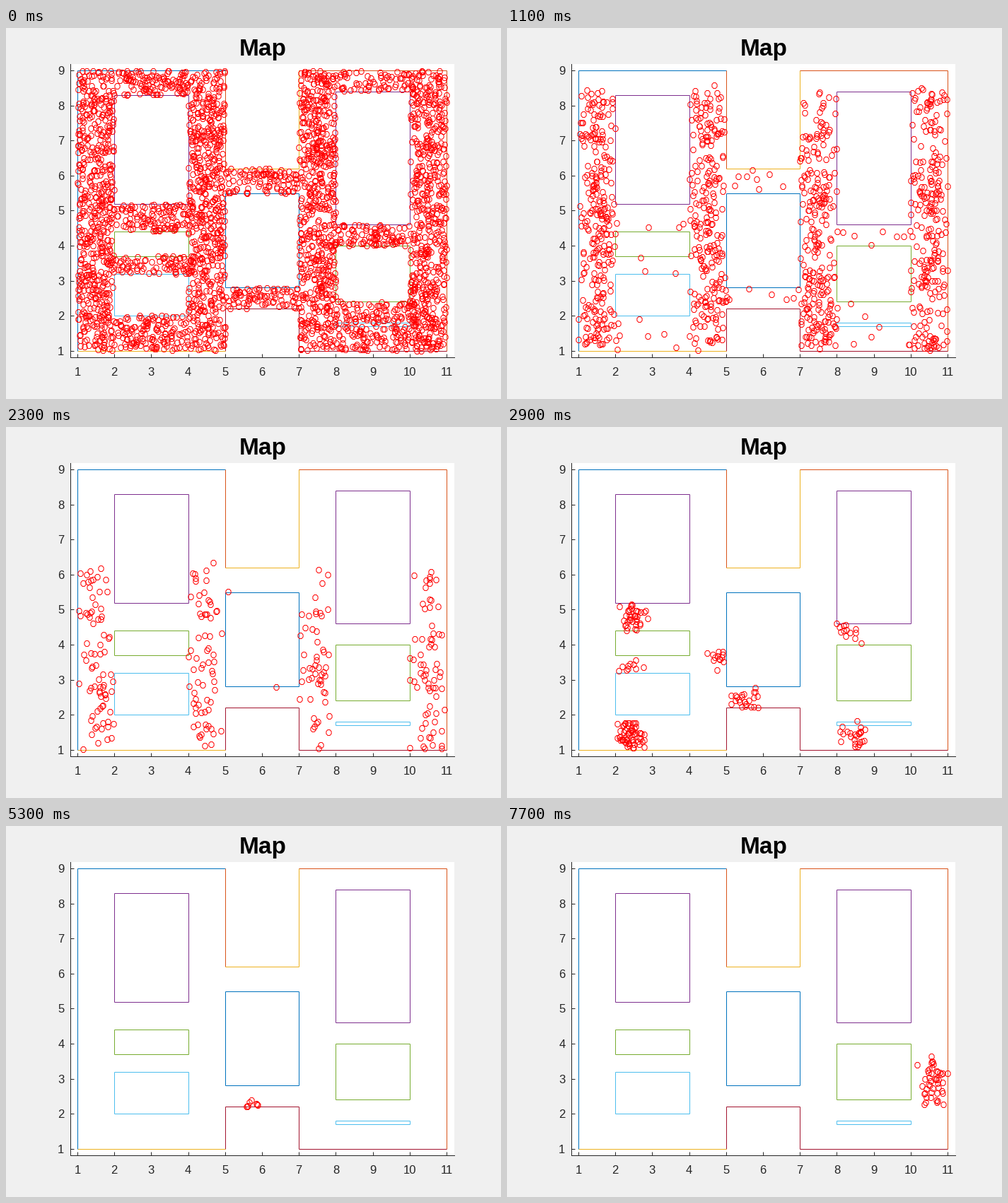
Write a matplotlib script that moves like this. It is 700 px wide and 525 px high and loops after 8 s.

```python
import numpy as np
import matplotlib.pyplot as plt
from matplotlib.animation import FuncAnimation

W, H, DPI = 700, 525, 100
PX = 72 / DPI
FRAMES, INTERVAL = 80, 100
STATES, TURN = 25, 7
SINK = 0.56  # downward travel per state before the turn

BLUE, ORANGE, YELLOW, PURPLE = "#0072BD", "#D95319", "#EDB120", "#7E2F8E"
GREEN, CYAN, CRIMSON = "#77AC30", "#4DBEEE", "#A2142F"

# x0, y0, x1, y1, colour
BOXES = [
    (2, 5.2, 4, 8.3, PURPLE), (2, 3.7, 4, 4.4, GREEN), (2, 2, 4, 3.2, CYAN),
    (5, 2.8, 7, 5.5, BLUE), (8, 4.6, 10, 8.4, PURPLE),
    (8, 2.4, 10, 4, GREEN), (8, 1.7, 10, 1.8, CYAN),
]
OUTLINE = [(1, 9), (5, 9), (5, 6.2), (7, 6.2), (7, 9), (11, 9), (11, 1),
           (7, 1), (7, 2.2), (5, 2.2), (5, 1), (1, 1), (1, 9)]
OUTLINE_COLORS = [BLUE, ORANGE, YELLOW, YELLOW, ORANGE, ORANGE, CRIMSON,
                  CRIMSON, CRIMSON, CRIMSON, YELLOW, BLUE]

# The robot's way after the turn: state, x, y
ROUTE = np.array([(7, 1.95, 5), (8, 2.5, 4.8), (10, 3.4, 4.75), (12, 4.5, 4.15),
                  (15, 5.2, 2.5), (16, 5.8, 2.28), (20, 8.9, 1.9),
                  (22, 10.25, 2.2), (24, 10.65, 2.95)]).T
# Rival guesses make the same moves elsewhere: offset and size
RIVALS = [(-0.05, -1.4, 14), (-0.08, -3.4, 62), (2.35, -1.2, 18),
          (3, -2.4, 28), (5.8, -0.4, 16), (5.9, -3.35, 28)]


def free(p):
    """True where a point lies in a corridor."""
    x, y = p.T
    wings = (x >= 1) & (x <= 11) & (y >= 1) & (y <= 9) & ((x <= 5) | (x >= 7))
    bridge = (x >= 5) & (x <= 7) & (y >= 2.2) & (y <= 6.2)
    ok = wings | bridge
    for x0, y0, x1, y1, _ in BOXES:
        ok &= ~((x > x0) & (x < x1) & (y > y0) & (y < y1))
    return ok


def cloud(seed, center, spread, n):
    noise = np.random.default_rng(seed).standard_normal((int(n), 2))
    p = np.clip(noise, -1.9, 1.9) * spread + center
    return p[free(p)]


def uniform(seed, n, x0=1, x1=11, top=9):
    p = np.random.default_rng(seed).uniform((x0, 1), (x1, top), (4 * n, 2))
    return p[free(p)][:n]


def sinking(state):
    """Clumps drift down the four long corridors while stray points die out."""
    top = 9 - SINK * (state - 1)
    strays = int(250 * 0.42 ** state)
    keep = 0.75 ** max(0, state - 4)
    parts = [uniform(state, 3 * strays, top=top)]
    for col in (1, 4, 7, 10):
        rng = np.random.default_rng(col)
        parts.append(uniform([col, state], strays, col, col + 1, top))
        for i, y in enumerate(np.linspace(-0.5, 6.9, 14) + rng.normal(0, 0.15, 14)):
            center = col + rng.uniform(0.38, 0.62), y + SINK * (4 - state)
            parts.append(cloud([col, i], center, (0.25, 0.26), rng.integers(5, 25) * keep))
    return np.vstack(parts)


def following(state):
    """One cloud follows the robot; rivals run into walls and fade."""
    times, xs, ys = ROUTE
    robot = np.array([np.interp(state, times, xs), np.interp(state, times, ys)])
    keys = (TURN, 16, STATES - 1)
    spread = np.interp(state, keys, (0.2, 0.2, 0.25)), np.interp(state, keys, (0.25, 0.07, 0.36))
    n = int(np.interp(state, keys, (42, 8, 46)))
    parts = [cloud(40, robot, spread, 6 * n)[:n]]
    if state < 16:
        for i, (dx, dy, size) in enumerate(RIVALS):
            parts.append(cloud(50 + i, robot + (dx, dy), (0.19, 0.19),
                               size * 0.85 ** (state - 8)))
    return np.vstack(parts)


def particles(state):
    if state == 0:
        return uniform(7, 3300)
    return sinking(state) if state < TURN else following(state)


def state_at(frame):
    return 0 if frame < 8 else 1 + (frame - 8) // 3


plt.rcParams["font.family"] = "Liberation Sans"
fig = plt.figure(figsize=(W / DPI, H / DPI), dpi=DPI, facecolor="#f0f0f0")

# Axes rectangle and data scale in pixels
LEFT, RIGHT, TOP, BOTTOM = 91, 634, 51, 466
X1, Y9, UNIT_X, UNIT_Y = 101, 60.3, 52.2, 49.54
ax = fig.add_axes([LEFT / W, 1 - BOTTOM / H, (RIGHT - LEFT) / W, (BOTTOM - TOP) / H])
ax.set_xlim(1 + (LEFT - X1) / UNIT_X, 1 + (RIGHT - X1) / UNIT_X)
ax.set_ylim(9 - (BOTTOM - Y9) / UNIT_Y, 9 - (TOP - Y9) / UNIT_Y)
ax.set_xticks(range(1, 12))
ax.set_yticks(range(1, 10))
ax.tick_params(direction="in", length=5 * PX, width=PX, color="#262626",
               labelcolor="#262626", labelsize=12)
ax.tick_params(axis="x", pad=13.5 * PX)
ax.tick_params(axis="y", pad=8.5 * PX)
ax.spines[["top", "right"]].set_visible(False)
for side in ("left", "bottom"):
    ax.spines[side].set(linewidth=PX, color="#262626")
fig.text(363 / W, 1 - 38.5 / H, "Map", size=24, weight="bold", ha="center", va="baseline")


def walls(points, colors):
    for a, b, color in zip(points, points[1:], colors):
        ax.plot(*zip(a, b), color=color, lw=PX, solid_capstyle="butt")


walls(OUTLINE, OUTLINE_COLORS)
for x0, y0, x1, y1, color in BOXES:
    walls([(x0, y0), (x1, y0), (x1, y1), (x0, y1), (x0, y0)], [color] * 4)

# Slightly tall octagonal ring
angles = np.radians(np.arange(22.5, 400, 45))
ring = np.column_stack([0.9 * np.cos(angles), np.sin(angles)])
dots, = ax.plot([], [], marker=ring, ls="", ms=8 * PX, mew=PX, mfc="none",
                mec="#ff0000", antialiased=False, clip_on=False, zorder=5)
clouds = [particles(s) for s in range(STATES)]


def update(frame):
    dots.set_data(*clouds[state_at(frame)].T)
    return dots,


anim = FuncAnimation(fig, update, frames=FRAMES, interval=INTERVAL,
                     repeat=True, repeat_delay=0)
plt.show()
```
